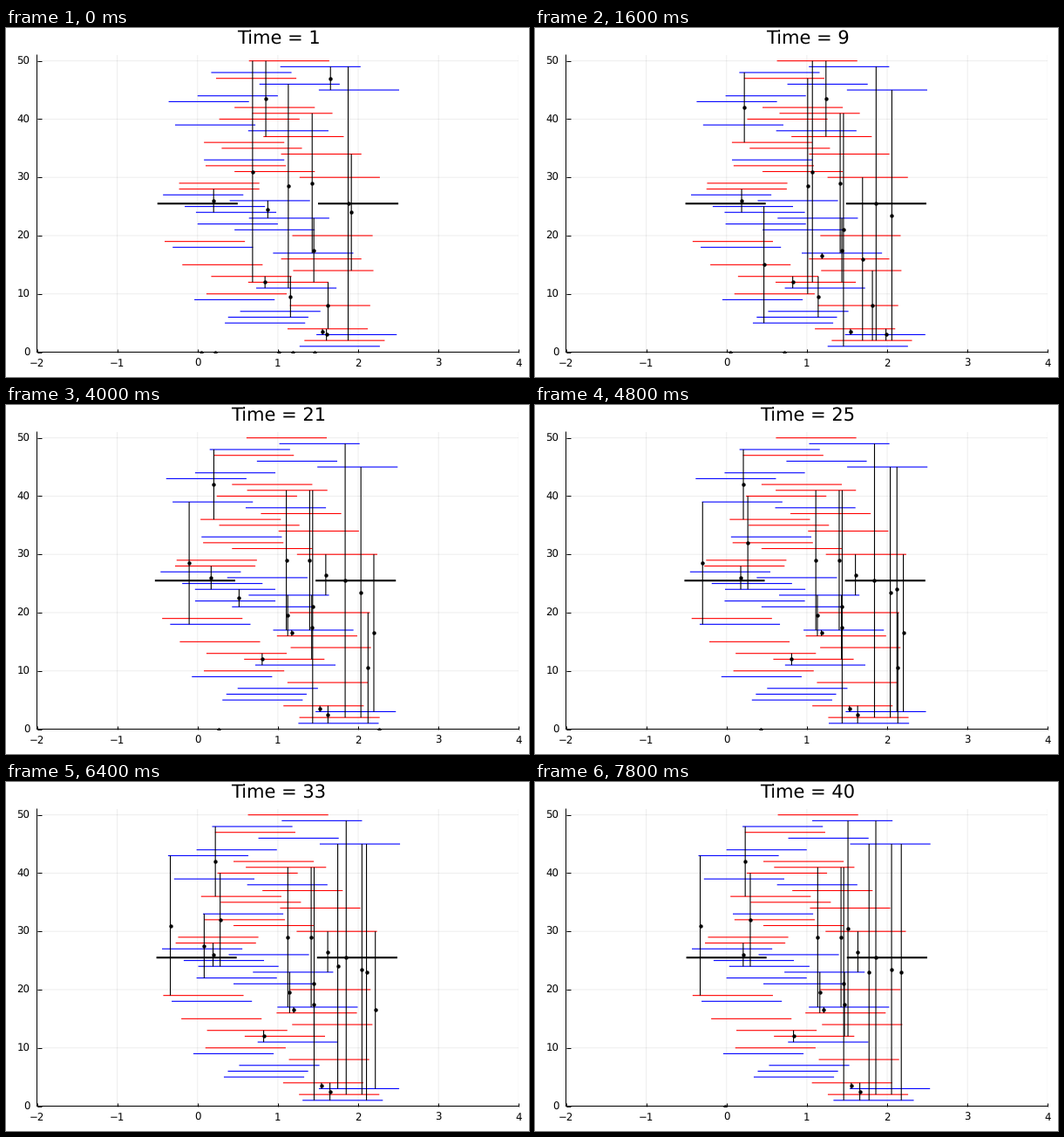
These frames come from a looping animation (600x400 px, 8 s). A matplotlib script:

```python
import numpy as np
import matplotlib.pyplot as plt
from matplotlib.animation import FuncAnimation
from matplotlib.collections import LineCollection

W, H, DPI = 600, 400, 100
STEPS, INTERVAL = 40, 200
LEFT, RIGHT, TOP, BOTTOM = 35.5, 588.3, 31, 371.5
X_MIN, X_MAX, Y_MAX = -2, 4, 51
PX = 72 / DPI    # points per pixel
WALK = 0.05      # motor step along its filaments
PUSH = 0.00095   # slide of a filament per step and stalled motor

# Left ends of the unit-long filaments 1..50 at the first time step
START = np.array([
    1.27, 1.33, 1.48, 1.12, 0.34, 0.38, 0.53, 1.15, -0.04, 0.11,
    0.73, 0.63, 0.17, 1.19, -0.19, 1.04, 0.94, -0.31, -0.41, 1.18,
    0.46, 0.0, 0.64, -0.02, -0.16, 0.4, -0.43, -0.23, -0.23, 1.27,
    0.46, 0.1, 0.08, 1.04, 0.3, 0.08, 0.82, 0.63, -0.28, 0.27,
    0.68, 0.46, -0.36, 0.0, 1.51, 0.77, 0.23, 0.17, 1.03, 0.64])
RED = {2, 4, 8, 10, *range(12, 17), 19, 20, *range(28, 33),
       *range(34, 38), *range(40, 43), 47, 50}
COLORS = ["red" if i in RED else "blue" for i in range(1, 51)]
HEADING = np.array([1 if c == "red" else -1 for c in COLORS])

# Motors: first x, then each binding as (time, lower, upper filament)
MOTORS = [
    (1.427, (1, 17, 41)),
    (1.875, (1, 2, 49)),
    (0.2, (1, 24, 28)),
    (1.448, (1, 12, 23)),
    (0.84, (1, 11, 13)),
    (1.555, (1, 3, 4)),
    (0.685, (1, 12, 50), (21, 23, 30)),
    (0.85, (1, 37, 50), (20, 1, 4)),
    (1.13, (1, 11, 46), (17, 21, 24), (26, 22, 33), (39, 39, 44)),
    (1.655, (1, 45, 49), (5, 2, 30), (22, 3, 45), (39, 12, 49)),
    (1.915, (1, 14, 34), (8, 2, 45)),
    (0.875, (1, 23, 26), (6, 5, 25), (18, 5, 33), (22, 24, 40)),
    (1.157, (1, 6, 13), (12, 16, 23)),
    (1.625, (1, 4, 12), (6, 2, 14), (20, 3, 30), (39, 1, 45)),
    (1.605, (1, 2, 4), (18, 1, 20), (32, 1, 45)),
    (0.05, (14, 22, 39), (20, 18, 39), (28, 19, 43)),
    (0.223, (8, 36, 48)),
    (1.01, (9, 10, 47), (20, 17, 41)),
    (1.19, (8, 16, 17)),
    (1.458, (8, 1, 41)),
]


def drift(t):
    """Common sway: left until half time, then back."""
    return -0.031 * (1 - abs(t - 21) / 20)


class Motor:
    def __init__(self, x, *bindings):
        self.x, self.pair = x, None
        self.plan = {t: np.array([lo, hi]) - 1 for t, lo, hi in bindings}

    def stalled(self):
        return self.pair is not None and HEADING[self.pair].sum() == 0

    def step(self, left, move):
        """Walk along the pair and let go past the end of either filament."""
        if self.pair is None:
            return
        head = HEADING[self.pair]
        self.x += WALK * head.mean() + move[self.pair].mean()
        if np.any(head * (self.x - left[self.pair] - 0.5) > 0.5):
            self.pair = None

    def state(self):
        lo, hi = (0, 0) if self.pair is None else self.pair + 1
        return self.x, lo, hi


def simulate():
    left, motors, history = START.copy(), [Motor(*m) for m in MOTORS], []
    for t in range(1, STEPS + 1):
        if t > 1:
            move = np.full(len(left), drift(t) - drift(t - 1))
            for m in motors:
                if m.stalled():
                    move[m.pair] -= PUSH * HEADING[m.pair]
            left = left + move
            for m in motors:
                m.step(left, move)
        for m in motors:
            m.pair = m.plan.get(t, m.pair)
        history.append((left, np.array([m.state() for m in motors])))
    return history


HISTORY = simulate()

plt.rcParams.update({"path.snap": False, "text.hinting": "none",
                     "font.family": "DejaVu Sans"})
fig = plt.figure(figsize=(W / DPI, H / DPI), dpi=DPI, facecolor="white")
ax = fig.add_axes([LEFT / W, 1 - BOTTOM / H,
                   (RIGHT - LEFT) / W, (BOTTOM - TOP) / H])
ax.set(xlim=(X_MIN, X_MAX), ylim=(0, Y_MAX))
x_ticks, y_ticks = range(X_MIN, X_MAX + 1), range(0, 51, 10)
ax.set_xticks(x_ticks, labels=[])
ax.set_yticks(y_ticks, labels=[])
ax.tick_params(direction="in", length=4.5 * PX, width=PX)
ax.grid(color="black", alpha=0.07, lw=PX)
ax.set_axisbelow(True)
for side, spine in ax.spines.items():
    spine.set_visible(side in ("left", "bottom"))
    spine.set_linewidth(PX)


def label(x, y, text, size, ha="center"):
    return fig.text(x / W, 1 - y / H, text, fontsize=size * PX, ha=ha,
                    va="baseline")


def segments(width, color, order):
    lines = LineCollection([], linewidths=width * PX, colors=color,
                           capstyle="butt", zorder=order)
    return ax.add_collection(lines, autolim=False)


for v in x_ticks:
    px = LEFT + (v - X_MIN) * (RIGHT - LEFT) / (X_MAX - X_MIN)
    label(px - 0.3, 387.6, str(v).replace("-", "\u2212"), 11.8)
for v in y_ticks:
    py = BOTTOM - v * (BOTTOM - TOP) / Y_MAX
    label(27.5, py + 4, str(v), 11.8, "right")

title = label(312.5, 18.3, "", 21)
rods = segments(1.1, COLORS, 3)
bars = segments(2.1, "black", 4)
links = segments(1.1, "black", 5)
dots = ax.scatter([], [], s=(4.4 * PX) ** 2, c="black", lw=0, zorder=6)


def flat(x, y):
    return [(x, y), (x + 1, y)]


def draw(k):
    left, motors = HISTORY[k]
    title.set_text(f"Time = {k + 1}")
    rods.set_segments([flat(x, i) for i, x in enumerate(left, 1)])
    bars.set_segments([flat(x + drift(k + 1), 25.5) for x in (-0.5, 1.5)])
    links.set_segments([[(x, lo), (x, hi)] for x, lo, hi in motors if hi])
    dots.set_offsets(np.column_stack([motors[:, 0],
                                      motors[:, 1:].mean(axis=1)]))
    return title, rods, bars, links, dots


anim = FuncAnimation(fig, draw, frames=STEPS, interval=INTERVAL,
                     repeat=True, repeat_delay=0, blit=False)
plt.show()
```
